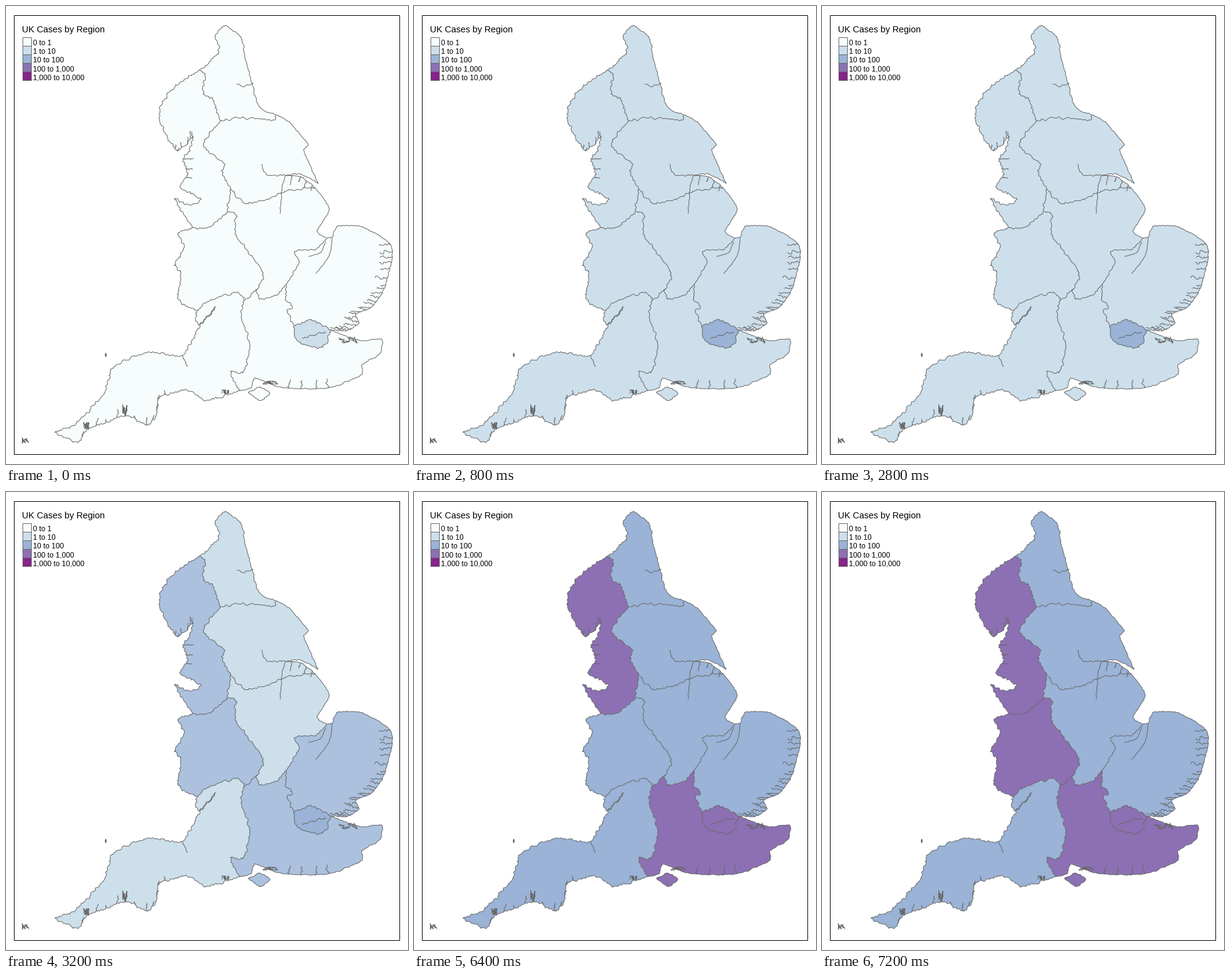
These frames come from a looping animation (656 by 747 pixels, 8 s). A matplotlib script:

```python
import numpy as np
import matplotlib.pyplot as plt
from matplotlib.animation import FuncAnimation
from matplotlib.collections import LineCollection
from matplotlib.patches import Polygon, Rectangle

W, H, DPI = 656, 747, 100
PX = 72 / DPI
GREY = "#666666"
BINS = ["#F7FDFD", "#CDDFEB", "#9AB3D6", "#8C70B3", "#86228A"]
LABELS = ["0 to 1", "1 to 10", "10 to 100", "100 to 1,000", "1,000 to 10,000"]

rng = np.random.default_rng(7)
lines = []


def smooth(pts, gap=7, tension=0.35):
    """Cardinal spline through key points, sampled about every gap pixels."""
    pts = np.asarray(pts, float)
    slope = tension * (np.vstack([pts[1:], pts[-1:]]) - np.vstack([pts[:1], pts[:-1]]))
    out = [pts[:1]]
    for a, b, ma, mb in zip(pts, pts[1:], slope, slope[1:]):
        n = max(1, round(np.hypot(*(b - a)) / gap))
        t = np.linspace(0, 1, n + 1)[1:, None]
        out.append((2 * t**3 - 3 * t**2 + 1) * a + (t**3 - 2 * t**2 + t) * ma
                   + (3 * t**2 - 2 * t**3) * b + (t**3 - t**2) * mb)
    return np.vstack(out)


def roughen(pts, amount, rounds=2):
    """Fractal midpoint displacement."""
    for _ in range(rounds):
        step = np.diff(pts, axis=0)
        normal = np.column_stack([-step[:, 1], step[:, 0]])
        mid = (pts[:-1] + pts[1:]) / 2 + normal * rng.uniform(-amount, amount, (len(step), 1))
        out = np.empty((len(pts) + len(mid), 2))
        out[::2], out[1::2] = pts, mid
        pts = out
    return pts


def arc(*keys, rough=0.32):
    pts = roughen(smooth(keys), rough) + 0.5
    lines.append(pts)
    return pts


def ring(*arcs):
    """Chain arcs into one outline, flipping each one where needed."""
    def gap(p, a):
        return min(np.hypot(*(p - a[0])), np.hypot(*(p - a[-1])))

    first = arcs[0]
    parts = [first[::-1] if gap(first[0], arcs[1]) < gap(first[-1], arcs[1]) else first]
    for a in arcs[1:]:
        end = parts[-1][-1]
        flip = np.hypot(*(end - a[-1])) < np.hypot(*(end - a[0]))
        parts.append(a[::-1] if flip else a)
    return np.vstack(parts)


def creeks(coast, lo, hi, n, dx, dy):
    """Short inlets at even steps along part of a coast."""
    for f in np.linspace(lo, hi, n):
        start = coast[int(f * (len(coast) - 1))]
        end = start + np.array([dx, dy]) * rng.uniform(0.6, 1.2) + rng.uniform(-3, 3, 2)
        lines.append(roughen(np.linspace(start, end, 4), 0.45))


def harbour(x, y, rx, ry, n=22):
    """A dense tangle of shoreline."""
    pts = rng.uniform(-1, 1, (n, 2)) * [rx, ry] + [x, y]
    lines.append(pts[np.argsort(pts[:, 0] + rng.uniform(-rx, rx, n) * 0.5)])


# Points where three outlines meet
TWEED, SOLWAY, TEES, HUMBER, WASH = (357, 31), (315, 104), (440, 177), (504, 296), (523, 378)
THAMES, SOLENT, SEVERN, DEE = (530, 528), (380, 627), (311, 497), (304, 361)
DALES, PEAK, MOOR = (349, 188), (366, 297), (361, 335)
COTSWOLD, AVON, OUSE, COLNE = (388, 480), (410, 461), (457, 453), (470, 521)

# Coasts and outer borders
border_n = arc(SOLWAY, (347, 75), (341, 49), TWEED)
coast_ne = arc(TWEED, (383, 50), (390, 85), (412, 162), TEES, rough=0.2)
coast_yh = arc(TEES, (461, 188), (493, 226), (485, 234), (509, 289), rough=0.12)
humber = arc((509, 289), (478, 273), (455, 276), (480, 278), HUMBER, rough=0.15)
coast_em = arc(HUMBER, (527, 330), (507, 367), WASH, rough=0.12)
coast_e = arc(WASH, (533, 375), (539, 359), (578, 359), (623, 384), (630, 410), (617, 460),
              (597, 490), (570, 502), (576, 516), (556, 529), THAMES, rough=0.15)
coast_se = arc(THAMES, (577, 545), (613, 543), (609, 567), (580, 585), (581, 600), (527, 622),
               (450, 622), (405, 606), (400, 622), SOLENT, rough=0.15)
coast_s = arc(SOLENT, (327, 643), (295, 626), (250, 638), (245, 668), (230, 683), (195, 668),
              (132, 690), (118, 711), (79, 695))
coast_sw = arc((79, 695), (114, 680), (160, 631), (173, 590), (229, 565), (287, 570), (313, 525))
severn = arc((313, 525), (341, 490), (314, 520), SEVERN)
border_w = arc(SEVERN, (281, 478), (285, 432), (274, 423), (291, 392), (280, 370), DEE)
coast_nw = arc(DEE, (275, 313), (297, 323), (318, 315), (284, 296), (297, 273), (288, 252),
               (300, 235), (304, 213), (278, 235), (249, 182), (266, 140), SOLWAY)
wight = arc((395, 630), (414, 621), (430, 631), (415, 643), (395, 630), rough=0.15)

# Borders between regions
ne_nw = arc(SOLWAY, (325, 115), (321, 143), (337, 150), DALES)
ne_yh = arc(DALES, (378, 182), (439, 185), TEES)
nw_yh = arc(DALES, (322, 226), (357, 258), (351, 268), PEAK)
yh_em = arc(PEAK, (390, 322), (430, 313), (460, 300), HUMBER)
nw_em = arc(PEAK, MOOR)
nw_wm = arc(DEE, (333, 360), MOOR)
wm_em = arc(MOOR, (375, 340), (373, 371), (392, 397), (419, 434), AVON)
wm_sw = arc(SEVERN, (332, 480), (378, 466), COTSWOLD)
wm_se = arc(COTSWOLD, AVON)
se_sw = arc(COTSWOLD, (384, 510), (397, 551), (386, 598), (366, 595), SOLENT)
em_se = arc(AVON, (413, 478), (443, 470), OUSE)
em_e = arc(OUSE, (478, 418), (470, 400), (506, 396), WASH, rough=0.2)
e_se = arc(OUSE, (456, 476), (467, 492), (458, 497), COLNE)
lon_n = arc(COLNE, (498, 511), THAMES)
lon_s = arc(THAMES, (517, 556), (485, 552), (472, 541), COLNE)

# Rivers and inlets
arc((532, 377), (527, 407), (505, 436), rough=0.08)
arc((521, 384), (513, 402), (493, 408), rough=0.08)
arc((455, 276), (450, 296), (447, 338), rough=0.2)
arc((455, 276), (425, 275), (416, 258))
arc((376, 127), (390, 130), (403, 126))
arc((483, 541), (500, 536), (522, 532))
arc((287, 570), (295, 588))
creeks(coast_e, 0.38, 0.54, 6, -22, 0)
creeks(coast_e, 0.58, 0.94, 16, -17, -3)
creeks(coast_se, 0.58, 0.74, 4, 1, -17)
creeks(coast_s, 0.35, 0.85, 12, 1, -10)
creeks(coast_nw, 0.37, 0.45, 3, 13, 2)
creeks(coast_nw, 0.53, 0.63, 6, 0, -12)
creeks(humber, 0.65, 0.95, 4, -2, 11)
for spot in [(358, 629, 6, 4), (432, 614, 13, 3), (194, 659, 4, 9), (131, 685, 5, 6),
             (558, 545, 16, 6), (32, 709, 6, 5), (163, 569, 1, 3)]:
    harbour(*spot)

SHAPES = {
    "ne": [ring(border_n, coast_ne, ne_yh, ne_nw)],
    "nw": [ring(ne_nw, nw_yh, nw_em, nw_wm, coast_nw)],
    "yh": [ring(ne_yh, coast_yh, humber, yh_em, nw_yh)],
    "em": [ring(yh_em, coast_em, em_e, em_se, wm_em, nw_em)],
    "wm": [ring(nw_wm, wm_em, wm_se, wm_sw, border_w)],
    "e": [ring(em_e, coast_e, lon_n, e_se)],
    "se": [ring(em_se, e_se, lon_s, coast_se, se_sw, wm_se), wight],
    "sw": [ring(wm_sw, se_sw, coast_s, coast_sw, severn)],
    "lon": [ring(lon_n, lon_s)],
}

# Colour changes: step -> (regions, fill)
SOFT, MEDIUM = "#B3C8E0", "#ABC1DE"
REST = "ne nw yh em wm e se sw"
CHANGES = {
    0: [(REST, BINS[0]), ("lon", BINS[1])],
    1: [("nw wm e se", BINS[1])],
    2: [(REST, BINS[1]), ("lon", BINS[2])],
    6: [("nw wm se", SOFT)],
    7: [("nw wm se", BINS[1])],
    8: [("nw wm e se", MEDIUM)],
    9: [("yh em", MEDIUM)],
    10: [(REST, BINS[2]), ("lon", BINS[3])],
    16: [("nw se", BINS[3])],
    17: [("nw se", BINS[2])],
    18: [("nw wm se", BINS[3])],
}

fig = plt.figure(figsize=(W / DPI, H / DPI), dpi=DPI, facecolor="white")
ax = fig.add_axes([0, 0, 1, 1])
ax.set_xlim(0, W)
ax.set_ylim(H, 0)
ax.axis("off")

patches = {name: [ax.add_patch(Polygon(o, lw=0, zorder=1)) for o in outlines]
           for name, outlines in SHAPES.items()}
ax.add_collection(LineCollection(lines, colors=GREY, linewidths=PX, zorder=2))


def box(x, y, w, h, fill, edge):
    ax.add_patch(Rectangle((x + 0.5, y + 0.5), w, h, fc=fill, ec=edge, lw=PX,
                           snap=False, zorder=3))


def label(x, y, text, size):
    ax.text(x, y, text, fontsize=size * PX, family="Liberation Sans",
            color="black", va="baseline", zorder=4)


box(13, 15, 629, 716, "none", "black")
label(26, 43, "UK Cases by Region", 14.5)
for k, (fill, text) in enumerate(zip(BINS, LABELS)):
    box(27, 51 + 14 * k, 14, 14, fill, GREY)
    label(44, 64 + 14 * k, text, 12)


def update(i):
    for step in range(i + 1):
        for names, fill in CHANGES.get(step, []):
            for name in names.split():
                for p in patches[name]:
                    p.set_facecolor(fill)
    return [p for group in patches.values() for p in group]


anim = FuncAnimation(fig, update, frames=20, interval=400, repeat=True,
                     repeat_delay=0, blit=False)
plt.show()
```
